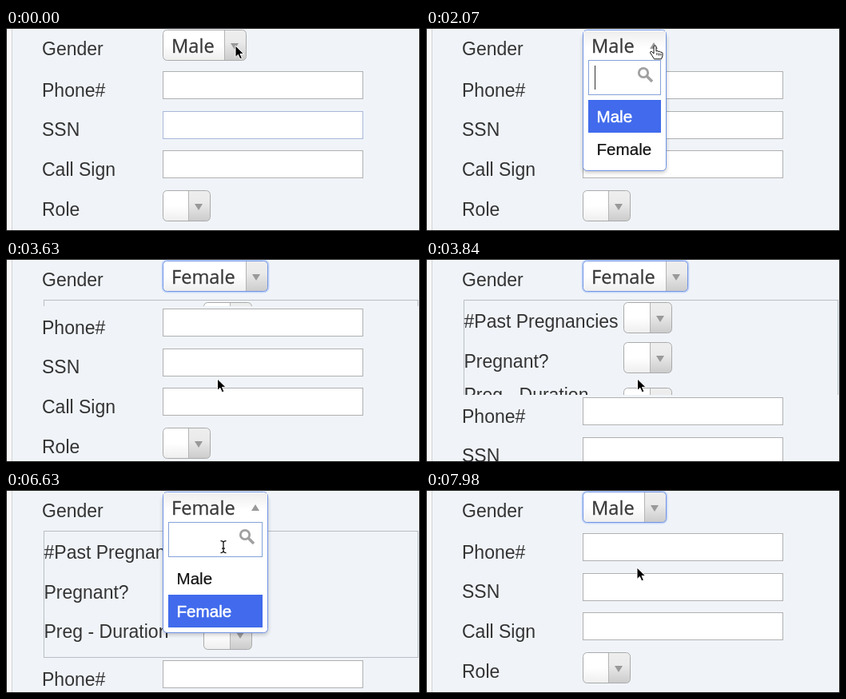
An HTML page for the animation above (8000 ms loop, 518 by 254 pixels).

```html
<!DOCTYPE html>
<html lang="en">
<head>
<meta charset="utf-8">
<title>Dependent form fields</title>
<style>
html, body { margin: 0; width: 100%; height: 100%; overflow: hidden; background: #f0f4f9; }
svg { display: block; width: 518px; height: 254px; }
text { white-space: pre; }
.label { font: 23px "Liberation Sans", Arial, sans-serif; fill: #333; }
.value { font: 23.6px "Open Sans", "Noto Sans", sans-serif; fill: #3a3a3a; stroke: #3a3a3a; stroke-width: .3; }
.item { font: 20.6px "Liberation Sans", Arial, sans-serif; fill: #111; stroke: #111; stroke-width: .2; }
.item.on { fill: #fff; stroke: #fff; stroke-width: .5; }
</style>
</head>
<body>
<svg id="stage" viewBox="0 0 518 254"></svg>
<script>
const LOOP = 8000, PANEL_TOP = 51, PANEL_H = 159;
const BLUE = '#6f93e6', GRAY = '#b0b0b0';

const rect = (x, y, w, h, attrs) =>
  `<rect x="${x}" y="${y}" width="${w}" height="${h}" ${attrs}/>`;
const box = (x, y, w, h, stroke, fill, more = '') =>
  rect(x + .5, y + .5, w - 1, h - 1, `stroke="${stroke}" fill="${fill}" ${more}`);
const text = (cls, x, y, s, more = '') =>
  `<text class="${cls}" x="${x}" y="${y}" ${more}>${s}</text>`;
const label = (x, y, s, more) => text('label', x, y, s, more);
const input = (y, more) => box(196, y, 251, 35, GRAY, '#fff', more);
const arrow = (x, y, dir) =>
  `<path d="M${x - 5} ${y - 4 * dir}h10l-5 ${8 * dir}z" fill="#999"/>`;

function select(x, y, w, focus) {
  const h = 39, s = x + w - 28, r = x + w - 1, b = y + h - 1;
  const glow = focus
    ? rect(x - .5, y - .5, w + 1, h + 1, 'rx="6" fill="none" stroke="#8fb0f0" stroke-opacity=".4" stroke-width="2"') : '';
  return glow +
    box(x, y, w, h, 'none', 'url(#face)', 'rx="5"') +
    `<path d="M${s} ${y + 1}H${r - 4}q4 0 4 4V${b - 4}q0 4-4 4H${s}z" fill="url(#grip)"/>` +
    rect(s, y + 1, 1, h - 2, 'fill="#b4b4b4"') +
    box(x, y, w, h, focus ? BLUE : '#aaa', 'none', 'rx="5"') +
    arrow(x + w - 15, y + 21, 1);
}

function dropdown(value, hot) {
  const w = value === 'Male' ? 105 : 132, right = 196 + w;
  const lens = right - 29;
  const option = (s, y) => (s === hot ? rect(203, y, w - 14, 41, 'fill="#416bec"') : '') +
    text(s === hot ? 'item on' : 'item', 213.5, y + 28, s);
  return rect(196, 8, w, 173, 'rx="5" fill="#000" opacity=".22" filter="url(#soft)"') +
    box(196, 2, w, 177, BLUE, '#fff', 'rx="5"') +
    rect(197, 4, w - 2, 35, 'fill="url(#openFace)"') +
    text('value', 207, 31, value) + arrow(right - 16, 22, -1) +
    box(203, 40, w - 14, 44, '#84a2d8', '#fff') +
    `<g fill="none" stroke="#a0a0a0"><circle cx="${lens}" cy="56" r="5.7" stroke-width="2.8"/>` +
    `<path d="M${lens + 4} 60l7 7" stroke-width="3.6"/></g>` +
    option('Male', 90) + option('Female', 131);
}

const gradient = (id, stops) => `<linearGradient id="${id}" x2="0" y2="1">` +
  stops.map(([o, c]) => `<stop offset="${o}" stop-color="${c}"/>`).join('') + '</linearGradient>';

const stage = document.getElementById('stage');
stage.innerHTML = `<defs>
  ${gradient('face', [[0, '#fff'], [.5, '#fff'], [1, '#eee']])}
  ${gradient('grip', [[0, '#eee'], [.4, '#eaeaea'], [1, '#ccc']])}
  ${gradient('openFace', [[0, '#eee'], [.6, '#fff']])}
  <filter id="soft" x="-20%" y="-20%" width="140%" height="140%"><feGaussianBlur stdDeviation="2.5"/></filter>
  <clipPath id="reveal"><rect id="window" x="40" y="${PANEL_TOP}" width="478" height="0"/></clipPath>
</defs>
${rect(0, 0, 518, 254, 'fill="#f0f4f9"')}
${rect(0, 0, 7, 254, 'fill="#f8f8f9"')}
${rect(7, 0, 1, 254, 'fill="#d2d3d5"')}
${label(45, 34, 'Gender')}
<g clip-path="url(#reveal)">
  ${box(47, PANEL_TOP, 469, PANEL_H, '#b9bec4', 'none')}
  ${label(47.5, 86, '#Past Pregnancies')}${select(247, 54, 61)}
  ${label(47.5, 136, 'Pregnant?')}${select(247, 104, 61)}
  ${label(47.5, 185, 'Preg - Duration', 'id="duration"')}${select(247, 161, 61)}
</g>
<g id="rest">
  ${label(45, 86, 'Phone#')}${input(54)}
  ${label(45, 135, 'SSN')}${input(104, 'id="ssn"')}
  ${label(45, 185, 'Call Sign')}${input(153)}
  ${label(45, 235, 'Role')}${select(196, 203, 60)}
</g>
<g id="gender"></g>
${rect(211, 47, 1, 30, 'id="caret" fill="#333"')}
${box(0, 0, 518, 254, '#1c1c1c', 'none')}
<g id="pointer">
  <path id="arrow" d="M0 0V14.5L3.4 11.4 5.8 16.8 8.4 15.7 6 10.4H10.6z" fill="#000" stroke="#fff"/>
  <path id="hand" d="M-2 10V2q0-2 1.5-2T1 2V7q2.500-1 3 .5 2-.8 2.800.8 2-.5 2.200 1.500v3l-1.500 4H-1.500l-2.500-4-2.500-4q0-2 2-1.200z M2 9v3M4.500 9.500v3M6.800 10v2.500" fill="#fff" stroke="#111"/>
  <path id="beam" d="M-3.500-7.500Q0-7.500 0-5V5Q0 7.500-3.500 7.500M3.500-7.500Q0-7.500 0-5V5Q0 7.500 3.500 7.500M-2 2H2" fill="none" stroke="#111" stroke-width="1.300"/>
</g>`;

const $ = id => document.getElementById(id);
const clamp = v => Math.max(0, Math.min(1, v));
const swing = p => .5 - Math.cos(clamp(p) * Math.PI) / 2;
const show = (el, on) => el.setAttribute('visibility', on ? 'visible' : 'hidden');

// time, x, y
const path = [
  [0, 287, 22], [2640, 287, 22], [3420, 264.5, 150], [4200, 264.5, 150],
  [4740, 288, 22], [6210, 288, 22], [6630, 272, 71], [6990, 264, 97], [LOOP, 264, 97]
];

function pointerAt(t) {
  const i = path.findIndex(p => p[0] > t);
  const [t0, x0, y0] = path[i - 1], [t1, x1, y1] = path[i];
  const p = (t - t0) / (t1 - t0);
  // the last trip passes through its middle point without stopping
  const e = t1 === 6630 ? p ** 1.5 : t0 === 6630 ? 1 - (1 - p) ** 1.8 : swing(p);
  return [x0 + (x1 - x0) * e, y0 + (y1 - y0) * e];
}

let lastKey = '';
function drawGender(value, open, focus, hot) {
  const key = [value, open, focus, hot].join();
  if (key === lastKey) return;
  lastKey = key;
  $('gender').innerHTML = open ? dropdown(value, hot)
    : select(196, 2, value === 'Male' ? 105 : 132, focus) + text('value', 207, 31, value);
}

function render(t) {
  const [x, y] = pointerAt(t);
  const first = t >= 1470 && t < 3480, second = t >= 5070 && t < 7350;
  const open = first || second;
  const value = t >= 3480 && t < 7350 ? 'Female' : 'Male';
  let hot = value;
  if (first && y > 131) hot = 'Female';
  if (second && y > 89) hot = 'Male';
  drawGender(value, open, t >= 1320, hot);

  const slide = swing((t - 3574) / 400) - swing((t - 7483) / 400);
  const height = Math.round(PANEL_H * slide);
  $('window').setAttribute('height', height);
  $('rest').setAttribute('transform', `translate(0 ${height})`);
  $('duration').setAttribute('y', slide < 1 ? 178 : 185);

  const fade = clamp((t - 30) / 120);
  const mix = (a, b) => Math.round(a + (b - a) * fade);
  $('ssn').setAttribute('stroke', `rgb(${mix(168, 176)},${mix(184, 176)},${mix(216, 176)})`);

  show($('caret'), first && t >= 1500 && !(t >= 2490 && t < 2990));
  const overSearch = open && y > 40 && y < 84;
  const hand = open && !overSearch && (first ? t >= 2070 : t >= 5790);
  show($('beam'), overSearch);
  show($('hand'), hand);
  show($('arrow'), !overSearch && !hand);
  $('pointer').setAttribute('transform', `translate(${x.toFixed(1)} ${y.toFixed(1)})`);
}

function tick() {
  render(performance.now() % LOOP);
  requestAnimationFrame(tick);
}
tick();
</script>
</body>
</html>
```
